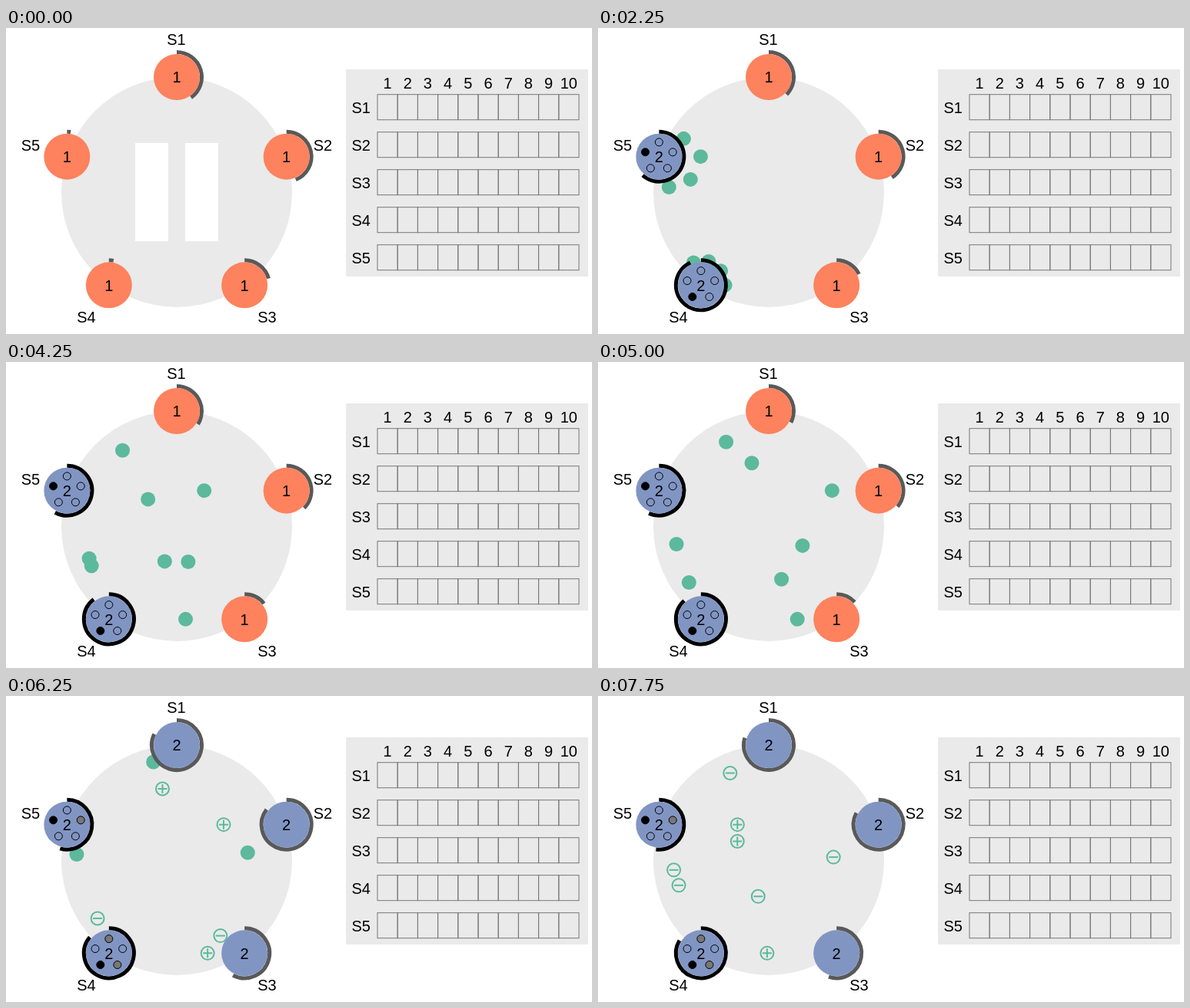
Recreate the animation shown at these times as an HTML page. Size 762x399 px, loop 8000 ms.

```html
<!DOCTYPE html>
<html lang="en">
<head>
<meta charset="utf-8">
<title>Leader election</title>
<style>
  html, body { margin: 0; width: 100%; height: 100%; overflow: hidden; background: #fff; }
  svg { display: block; width: 762px; height: 399px; }
  text { font: 20px "Liberation Sans", Helvetica, Arial, sans-serif; fill: #000; text-anchor: middle; }
  .row { text-anchor: start; }
  .panel { fill: #eaeaea; }
  .cell { fill: none; stroke: #777; stroke-width: 1; }
  .arc { fill: none; stroke: #595959; stroke-width: 5; }
  .arc.candidate { stroke: #000; }
  .term1 { fill: #fd825d; }
  .term2 { fill: #8195c3; }
  .vote { fill: none; stroke: #000; stroke-width: 1; }
  .vote.have { fill: #000; }
  .vote.coming { fill: #777; }
  .request { fill: #5cb99c; }
  .reply { fill: none; stroke: #5cb99c; stroke-width: 2; }
  .pause { fill: #fff; }
</style>
</head>
<body>
<svg id="stage" viewBox="0 0 762 399">
  <circle class="panel" cx="222" cy="214" r="150"/>
  <g id="pause" class="pause">
    <rect x="168" y="150" width="43" height="128"/>
    <rect x="233" y="150" width="43" height="128"/>
  </g>
  <g id="messages"></g>
  <g id="servers"></g>
  <g id="log"><rect class="panel" x="442" y="54" width="315" height="270"/></g>
</svg>
<script>
const LOOP = 8000, HOLD = 500, STEP = 250;
const R = 30, TURN = 1.55; // timers lose TURN degrees per step
const byId = id => document.getElementById(id);

function add(parent, tag, attrs, text) {
  const el = document.createElementNS('http://www.w3.org/2000/svg', tag);
  for (const k in attrs) el.setAttribute(k, attrs[k]);
  if (text !== undefined) el.textContent = text;
  parent.appendChild(el);
  return el;
}
const show = (el, on) => el.setAttribute('visibility', on ? 'visible' : 'hidden');

function around(cx, cy, r, deg) {
  const a = deg * Math.PI / 180;
  return { x: cx + r * Math.sin(a), y: cy - r * Math.cos(a) };
}

// first: timer angle at step 0; change: step of term 2; next: timer angle then
const servers = [
  { first: 145, change: 20.5, next: 300, label: [221.5, 22] },
  { first: 158, change: 19.95, next: 312, label: [412, 160] },
  { first: 74.5, change: 20.45, next: 211.5, label: [339.5, 384] },
  { first: 10.5, change: 6.85, next: 335.2, label: [104.5, 384], candidate: true },
  { first: 8.4, change: 5.45, next: 223.4, label: [32, 160], candidate: true }
];

// vote request sent and received, then the time its reply takes
const calls = [
  { from: 5, to: 1, sent: 5.45, got: 24.2, back: 17.4 },
  { from: 5, to: 2, sent: 5.45, got: 19.95, back: 13.3, yes: true },
  { from: 5, to: 3, sent: 5.45, got: 22.4, back: 15.5 },
  { from: 5, to: 4, sent: 5.45, got: 20.65, back: 15.4 },
  { from: 4, to: 1, sent: 6.85, got: 20.5, back: 18.8, yes: true },
  { from: 4, to: 2, sent: 6.85, got: 25.7, back: 17.6 },
  { from: 4, to: 3, sent: 6.85, got: 20.45, back: 16.5, yes: true },
  { from: 4, to: 5, sent: 6.85, got: 24.65, back: 15.7 }
];

servers.forEach((s, i) => {
  Object.assign(s, around(222, 214, 150, i * 72));
  const g = add(byId('servers'), 'g');
  s.arc = add(g, 'path');
  s.disc = add(g, 'circle', { cx: s.x, cy: s.y, r: R });
  s.term = add(g, 'text', { x: s.x, y: s.y + 7.2 });
  add(g, 'text', { x: s.label[0], y: s.label[1] }, 'S' + (i + 1));
  s.votes = !s.candidate ? [] : servers.map((peer, j) => {
    const p = around(s.x, s.y, R * 5 / 8, j * 72);
    const call = calls.find(c => c.from === i + 1 && c.to === j + 1 && c.yes);
    return { self: i === j, call, el: add(g, 'circle', { cx: p.x, cy: p.y, r: 5 }) };
  });
});

for (const c of calls) {
  const box = byId('messages');
  c.request = add(box, 'circle', { class: 'request', r: 9.5 });
  c.reply = add(box, 'g', { class: 'reply' });
  add(c.reply, 'circle', { r: 8.5 });
  add(c.reply, 'path', { d: 'M-6 0H6' + (c.yes ? 'M0 -6V6' : '') });
}

const log = byId('log');
for (let col = 0; col < 10; col++)
  add(log, 'text', { x: 496 + col * 26.2, y: 79 }, col + 1);
for (let row = 0; row < 5; row++) {
  const y = 87 + row * 49;
  add(log, 'text', { class: 'row', x: 449.5, y: y + 24 }, 'S' + (row + 1));
  for (let col = 0; col < 10; col++)
    add(log, 'rect', { class: 'cell', x: 483 + col * 26.2, y: y - .3, width: 26.2, height: 33 });
}

function place(el, from, to, frac) {
  const on = frac >= 0 && frac < 1;
  show(el, on);
  if (!on) return;
  const a = servers[from - 1], b = servers[to - 1];
  const dx = b.x - a.x, dy = b.y - a.y, len = Math.hypot(dx, dy);
  const d = (R + frac * (len - 2 * R)) / len;
  el.setAttribute('transform', `translate(${a.x + dx * d} ${a.y + dy * d})`);
}

function drawServer(s, k) {
  const changed = k >= s.change;
  const deg = changed ? s.next - TURN * (k - s.change) : s.first - TURN * k;
  const r = R + 2.5, end = around(s.x, s.y, r, deg);
  s.arc.setAttribute('d',
    `M${s.x} ${s.y - r}A${r} ${r} 0 ${deg > 180 ? 1 : 0} 1 ${end.x} ${end.y}`);
  s.arc.setAttribute('class', changed && s.candidate ? 'arc candidate' : 'arc');
  s.disc.setAttribute('class', changed ? 'term2' : 'term1');
  s.term.textContent = changed ? 2 : 1;
  for (const v of s.votes) {
    show(v.el, changed);
    const coming = v.call && k >= v.call.got;
    v.el.setAttribute('class', 'vote' + (v.self ? ' have' : coming ? ' coming' : ''));
  }
}

function draw(ms) {
  const k = Math.max(0, Math.floor((ms % LOOP - HOLD) / STEP));
  show(byId('pause'), k === 0);
  servers.forEach(s => drawServer(s, k));
  for (const c of calls) {
    place(c.request, c.from, c.to, (k - c.sent) / (c.got - c.sent));
    place(c.reply, c.to, c.from, (k - c.got) / c.back);
  }
}

const start = performance.now();
function tick() {
  draw(performance.now() - start);
  requestAnimationFrame(tick);
}
tick();
</script>
</body>
</html>
```
